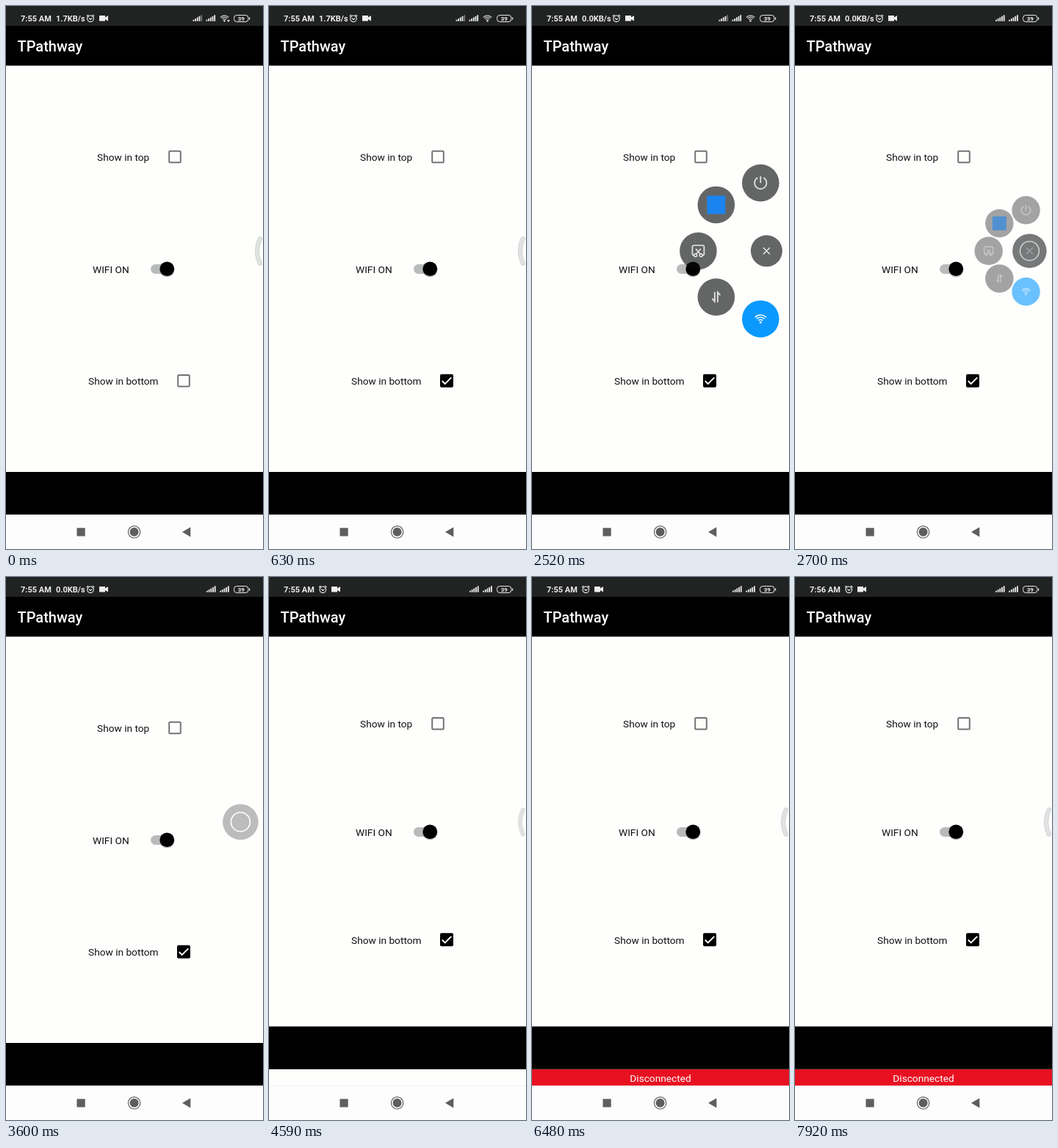
Write an HTML page with a canvas that moves like this. It is 350 px wide and 740 px high and loops after 8 s.

```html
<!DOCTYPE html>
<html lang="en">
<head>
<meta charset="utf-8">
<style>
  html, body { margin: 0; width: 100%; height: 100%; overflow: hidden; background: #fefefd; }
  canvas { display: block; width: 350px; height: 740px; }
</style>
</head>
<body>
<canvas id="stage"></canvas>
<script>
const LOOP = 8000;
const FONT = 'Roboto, sans-serif';
const canvas = document.getElementById('stage');
const ctx = canvas.getContext('2d');
const dpr = window.devicePixelRatio || 1;
canvas.width = 350 * dpr;
canvas.height = 740 * dpr;

const clamp = v => Math.min(1, Math.max(0, v));
const progress = (t, from, to) => clamp((t - from) / (to - from));
const mix = (a, b, p) => a + (b - a) * p;
const easeOut = p => 1 - (1 - p) ** 3;

function rect(x, y, w, h, color) {
  ctx.fillStyle = color;
  ctx.fillRect(x, y, w, h);
}

function roundRect(x, y, w, h, r) {
  ctx.beginPath();
  ctx.roundRect(x, y, w, h, r);
}

function disc(x, y, r, color) {
  ctx.fillStyle = color;
  ctx.beginPath();
  ctx.arc(x, y, r, 0, Math.PI * 2);
  ctx.fill();
}

function ring(x, y, r, color, width) {
  ctx.strokeStyle = color;
  ctx.lineWidth = width;
  ctx.beginPath();
  ctx.arc(x, y, r, 0, Math.PI * 2);
  ctx.stroke();
}

function stroke(path, color, width) {
  ctx.strokeStyle = color;
  ctx.lineWidth = width;
  ctx.stroke(new Path2D(path));
}

function fill(path, color) {
  ctx.fillStyle = color;
  ctx.fill(new Path2D(path));
}

function text(str, x, y, size, color, weight = 400, align = 'left') {
  ctx.font = `${weight} ${size}px ${FONT}`;
  ctx.textAlign = align;
  ctx.fillStyle = color;
  ctx.fillText(str, x, y);
}

// Draws in a local coordinate system with its own opacity.
function at(x, y, draw, { scale = 1, alpha = 1, angle = 0 } = {}) {
  ctx.save();
  ctx.translate(x, y);
  ctx.rotate(angle);
  ctx.scale(scale, scale);
  ctx.globalAlpha *= alpha;
  draw();
  ctx.restore();
}

function wifiGlyph(size, color) {
  ctx.strokeStyle = color;
  ctx.lineWidth = size * 0.15;
  for (const r of [0.4, 0.74, 1.08]) {
    ctx.beginPath();
    ctx.arc(0, size * 0.5, r * size, -Math.PI * 0.77, -Math.PI * 0.23);
    ctx.stroke();
  }
  disc(0, size * 0.48, size * 0.17, color);
}

function signalBars(x) {
  for (let i = 0; i < 5; i++) {
    const h = 2 + i * 1.6;
    rect(x + i * 2.7, 20.7 - h, 1.8, h, i === 4 && x < 260 ? '#777' : '#eee');
  }
}

function statusBar(t) {
  const white = '#eee';
  rect(0, 0, 350, 27, '#212222');
  text(t < 7380 ? '7:55 AM' : '7:56 AM', 20, 20.5, 11, white, 600);

  const showSpeed = t < 4050;
  if (showSpeed) text(t < 1890 ? '1.7KB/s' : '0.0KB/s', 68, 20.5, 11, white, 600);

  at(showSpeed ? 115 : 73.3, 17, () => {
    ring(0, 0.3, 4.3, white, 1.1);
    stroke('M-5.2 -3 L-2.8 -5.2 M5.2 -3 L2.8 -5.2 M-2 -0.5 L0 1.5 L2.2 -0.3', white, 1.1);
  });
  at(showSpeed ? 127 : 85, 13, () =>
    fill('M0 0 H8 V2.5 L12 0 V7.5 L8 5 V7.5 H0 Z', white));

  const wifiOn = t < 2700;
  signalBars(wifiOn ? 254.5 : 273);
  signalBars(wifiOn ? 272.5 : 291.2);
  if (wifiOn) {
    at(297.5, 17, () => wifiGlyph(7, white));
    if (t < 500) fill('M301 19 h4 l-2 3 z', white);
  }

  ctx.strokeStyle = white;
  ctx.lineWidth = 1;
  roundRect(310.5, 12.5, 19.5, 9, 3.8);
  ctx.stroke();
  rect(331, 15.5, 1.2, 3.2, white);
  text('39', 320.3, 20, 8, white, 600, 'center');
}

function checkbox(x, y, checked) {
  if (!checked) {
    ctx.strokeStyle = '#747474';
    ctx.lineWidth = 2;
    roundRect(x - 7.8, y - 7.8, 15.6, 15.6, 1.2);
    ctx.stroke();
    return;
  }
  ctx.fillStyle = '#000';
  roundRect(x - 9, y - 9, 18, 18, 2);
  ctx.fill();
  at(x, y, () => stroke('M-6.2 0.3 L-2.3 4.2 L6.2 -4.3', '#fff', 2));
}

function appBody(t) {
  const shifted = t >= 4580;
  const [topY, wifiY, bottomY] = shifted ? [199.8, 347.2, 494.2] : [205.5, 358.3, 510.7];
  const footerY = shifted ? 612.5 : 635;

  rect(0, 27, 350, 713, '#fefefd');
  rect(0, 27, 350, 54.3, '#000');
  text('TPathway', 15.5, 62, 20, '#fff', 500);

  text('Show in top', 124, topY + 5.3, 13.7, '#111');
  checkbox(230, topY, false);

  text('WIFI ON', 118, wifiY + 5.3, 13.7, '#111');
  ctx.fillStyle = '#b8bbb9';
  roundRect(197, wifiY - 6.3, 29, 13, 6.5);
  ctx.fill();
  disc(219.3, wifiY + 0.8, 10.3, 'rgba(0,0,0,.25)');
  disc(219.3, wifiY, 9.8, '#000');

  text('Show in bottom', 112, bottomY + 5.3, 13.7, '#111');
  if (t >= 270 && t < 630) {
    const p = progress(t, 180, 630);
    disc(242, bottomY, 19 * easeOut(p), `rgba(0,0,0,${0.2 * (1 - p)})`);
  }
  checkbox(242, bottomY, t >= 360);

  rect(0, footerY, 350, 58.3, '#000');
}

function disconnectedBanner(t) {
  if (t < 4580) return;
  const blinkHidden = t >= 5170 && Math.floor((t - 5170) / 140) % 2 === 0;
  ctx.globalAlpha = progress(t, 4600, 4900);
  rect(0, 671, 350, 22.3, '#e81121');
  if (!blinkHidden) text('Disconnected', 175, 687.6, 13.7, '#fff', 400, 'center');
  ctx.globalAlpha = 1;
}

function navBar() {
  const gray = '#5e5e5e';
  rect(0, 693.3, 350, 47, '#fdfdfd');
  rect(0, 693.2, 350, 0.8, '#f0f0f0');
  rect(96.5, 711.3, 11.2, 11.2, gray);
  ring(174.6, 716.8, 8.2, gray, 1.2);
  disc(174.6, 716.8, 6, gray);
  fill('M240 716.8 L251.3 710.2 V723.4 Z', gray);
}

const menuIcons = [
  () => {
    ctx.beginPath();
    ctx.arc(0, 0, 8.2, -Math.PI * 0.34, Math.PI * 1.34);
    ctx.strokeStyle = '#e8e8e8';
    ctx.lineWidth = 1.7;
    ctx.stroke();
    stroke('M0 -9 V0', '#e8e8e8', 1.7);
  },
  () => rect(-12.5, -12.5, 25, 25, '#1b84ee'),
  () => {
    stroke('M-5 6 H-6 Q-8 6 -8 4 V-5.5 Q-8 -7.5 -6 -7.5 H6 Q8 -7.5 8 -5.5 V4 Q8 6 6 6 H5', '#e8e8e8', 1.6);
    stroke('M-3.5 -3 L3 4.5 M3.5 -3 L-3 4.5', '#e8e8e8', 1.5);
    ring(-3.8, 6, 2, '#e8e8e8', 1.4);
    ring(3.8, 6, 2, '#e8e8e8', 1.4);
  },
  () => stroke('M-2 -7 V6 L-5.5 2 M2 7 V-6.5 L5.5 -2.5', '#e8e8e8', 1.7),
  () => wifiGlyph(9.5, '#fff'),
];

function quickMenu(t) {
  const opening = Math.exp(-(t - 1890) / 80);
  const closing = progress(t, 2530, 2800);
  const open = 1 - closing ** 2;
  const distance = (93 - 5 * opening) * open;
  const gray = 'rgba(8,10,11,.62)';

  menuIcons.forEach((icon, i) => {
    const angle = (95 + i * 42.5) * Math.PI / 180;
    const x = 319.4 + Math.cos(angle) * distance;
    const y = 333.8 - Math.sin(angle) * distance;
    at(x, y, () => {
      disc(0, 0, 25.3, i === 4 ? '#0b99fd' : gray);
      icon();
    }, { scale: mix(0.4, 1, open), alpha: open });
  });

  const x = 319.4 + 12 * opening;
  const alpha = mix(0.62 - 0.16 * opening, 0.5, closing);
  disc(x, 333.8, mix(21.5, 24.3, closing), `rgba(8,10,11,${alpha})`);
  at(x, 333.8, () => stroke('M-4.5 -4.5 L4.5 4.5 M-4.5 4.5 L4.5 -4.5', '#eee', 1.3),
    { scale: 1 - 0.5 * opening, alpha: 1 - closing, angle: opening * 0.5 });
  ring(x, 333.8, 13, `rgba(255,255,255,${closing})`, 1.6);
}

function floatingBall(t) {
  const dim = easeOut(progress(t, 3510, 3690));
  const away = progress(t, 4410, 4590);
  at(319.4 + 31 * away, 333.8, () => {
    disc(0, 0, 24.3, `rgba(8,10,11,${mix(0.5, 0.24, dim)})`);
    ring(0, 0, 13, '#fff', 1.6);
  }, { alpha: 1 - away });
}

function edgeHandle(alpha) {
  ctx.save();
  ctx.globalAlpha = alpha;
  ctx.lineCap = 'round';
  const curve = 'M345.8 317.3 Q338.3 334 345.8 350.7';
  stroke(curve, '#c9cccA', 6);
  stroke(curve, '#e0e3e1', 4.6);
  ctx.restore();
}

function draw(t) {
  ctx.setTransform(dpr, 0, 0, dpr, 0, 0);
  appBody(t);
  statusBar(t);
  disconnectedBanner(t);
  navBar();
  if (t < 1890) edgeHandle(1);
  else if (t < 2880) quickMenu(t);
  else {
    if (t < 4590) floatingBall(t);
    if (t >= 4500) edgeHandle(progress(t, 4440, 4700));
  }
}

function frame() {
  draw(performance.now() % LOOP);
  requestAnimationFrame(frame);
}
frame();
</script>
</body>
</html>
```
